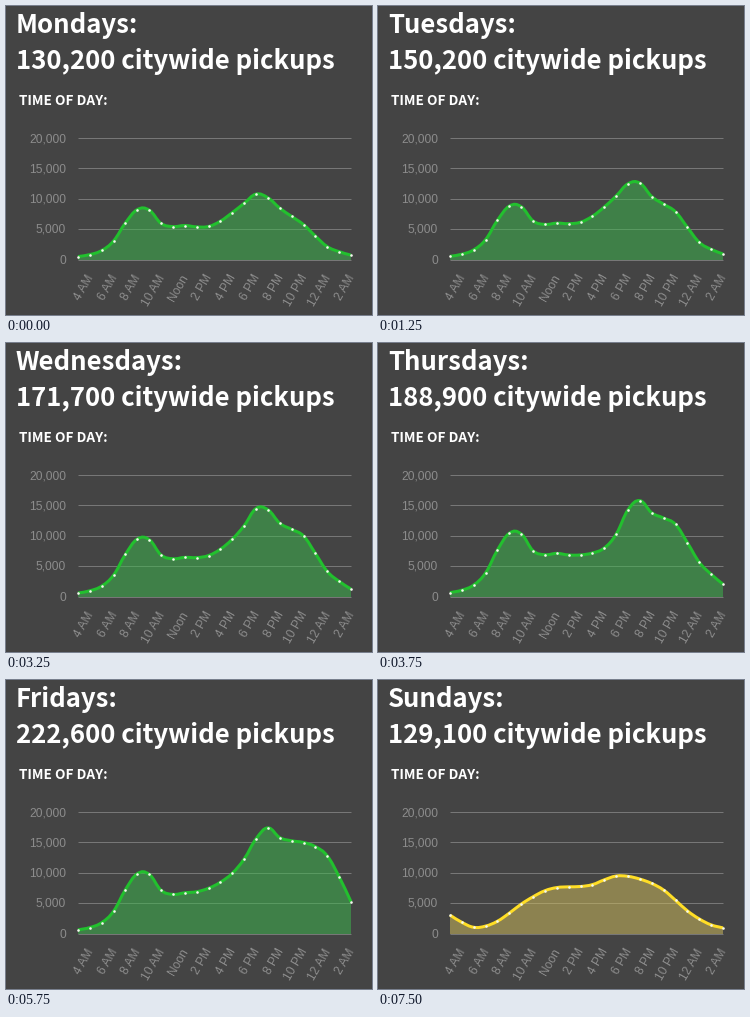
Animation, 366 px wide and 309 px high, one loop 8750 ms. Source, as a matplotlib script:

```python
import numpy as np
import matplotlib.pyplot as plt
from matplotlib.animation import FuncAnimation
from matplotlib.patches import PathPatch
from matplotlib.path import Path

W, H, DPI = 366, 309, 64
PX = 72 / DPI  # points per pixel
LEFT, RIGHT, BASE, TOP = 72, 345, 254, 132
HEAD = ["Noto Sans CJK JP", "Liberation Sans"]
GREEN = ("#22c02e", "#3cbc4c")
YELLOW = ("#ffde26", "#d4c05c")

# Key points: hours after 3 AM, pickups in hundreds
MORNING_HOURS = [0, 2, 3, 4, 5, 6, 7, 9]
MORNING_RUSH = np.array([6.5, 18, 36, 70, 95, 94, 69, 65])
EVENING_HOURS = [11, 14, 15, 16, 17, 19, 21, 23]
WEEKEND_HOURS = [0, 2, 4, 6, 8, 12, 14, 16, 18, 20, 22, 23]


def smooth(hours, values):
    """Cubic through the key points, sampled at each hour."""
    x, y = np.array(hours), np.array(values)
    slope = np.gradient(y, x)
    t = np.arange(24)
    i = np.clip(np.searchsorted(x, t, "right") - 1, 0, len(x) - 2)
    h = x[i + 1] - x[i]
    u = (t - x[i]) / h
    ease = u * u * (3 - 2 * u)
    bend = u * (1 - u) * ((1 - u) * slope[i] - u * slope[i + 1])
    return y[i] + ease * (y[i + 1] - y[i]) + h * bend


def weekday(name, total, rush, evening):
    """Every weekday has the same morning, only busier or calmer."""
    values = smooth(MORNING_HOURS + EVENING_HOURS, [*(MORNING_RUSH * rush), *evening])
    return name, total, values, GREEN


def weekend(name, total, values):
    return name, total, smooth(WEEKEND_HOURS, values), YELLOW


DAYS = [
    weekday("Mondays", 130200, 0.87, [55, 93, 108, 102, 85, 58, 22, 8]),
    weekday("Tuesdays", 150200, 0.93, [62, 105, 125, 126, 104, 79, 29, 10]),
    weekday("Wednesdays", 171700, 1.0, [68, 117, 145, 143, 121, 100, 42, 13]),
    weekday("Thursdays", 188900, 1.1, [69, 103, 143, 158, 138, 119, 57, 21]),
    weekday("Fridays", 222600, 1.04, [75, 123, 156, 174, 158, 150, 128, 53]),
    weekend("Saturdays", 220700, [24, 11, 27, 63, 86, 100, 127, 168, 143, 153, 108, 65]),
    weekend("Sundays", 129100, [31, 11, 21, 49, 71, 81, 95, 90, 72, 38, 15, 10]),
]

xs = np.linspace(LEFT, RIGHT, 24)


def to_y(hundreds):
    return BASE - np.asarray(hundreds) * (BASE - TOP) / 200


def spline(ys):
    """Bezier curve through all points, with its path codes."""
    points = np.column_stack([xs, ys])
    handle = 0.4 * np.gradient(points, axis=0)
    verts = [points[0]]
    for i in range(len(xs) - 1):
        verts += [points[i] + handle[i], points[i + 1] - handle[i + 1], points[i + 1]]
    return verts, [Path.MOVETO] + [Path.CURVE4] * (len(verts) - 1)


fig = plt.figure(figsize=(W / DPI, H / DPI), dpi=DPI, facecolor="#444444")
ax = fig.add_axes([0, 0, 1, 1])
ax.set(xlim=(0, W), ylim=(H, 0))
ax.axis("off")


def label(x, y, text, size, color="white", **kw):
    kw = {"family": HEAD, "weight": "bold", "va": "baseline", **kw}
    return ax.text(x, y, text, fontsize=size * PX, color=color, **kw)


title = label(10, 27, "", 25.7)
total_text = label(10, 63, "", 25.7)
label(13.3, 99, "TIME OF DAY:", 13.6)

small = dict(size=12, color="#8c8c8c", family="Liberation Sans",
             weight="normal", ha="right")
for value in range(0, 201, 50):
    y = np.floor(to_y(value))
    ax.plot([LEFT, RIGHT], [y, y], color="#777777", lw=PX, zorder=1,
            solid_capstyle="butt")
    label(60, y + 4, f"{value * 100:,}", **small)

for i in range(1, 24, 2):
    hour = (i + 3) % 24
    text = "Noon" if hour == 12 else f"{hour % 12 or 12} {'AM' if hour < 12 else 'PM'}"
    label(xs[i] + 3.8, 271, text, rotation=60, rotation_mode="anchor", **small)

blank = Path([(0, 0), (0, 0)])
area = ax.add_patch(PathPatch(blank, lw=0, alpha=0.5, zorder=2))
curve = ax.add_patch(PathPatch(blank, fill=False, lw=3 * PX, zorder=3,
                               capstyle="butt", joinstyle="round"))
dots, = ax.plot([], [], "o", ms=2.6 * PX, mew=0, color="#f4f8ee", zorder=4)


def update(frame):
    name, total, values, (line, fill) = DAYS[frame]
    ys = to_y(values)
    verts, codes = spline(ys)
    closed = verts + [(RIGHT, BASE), (LEFT, BASE), verts[0]]
    area.set_path(Path(closed, codes + [Path.LINETO] * 2 + [Path.CLOSEPOLY]))
    area.set_facecolor(fill)
    curve.set_path(Path(verts, codes))
    curve.set_edgecolor(line)
    dots.set_data(xs, ys)
    title.set_text(f"{name}:")
    total_text.set_text(f"{total:,} citywide pickups")
    return area, curve, dots, title, total_text


anim = FuncAnimation(fig, update, frames=len(DAYS), interval=1250,
                     repeat=True, repeat_delay=0, blit=False)
plt.show()
```
